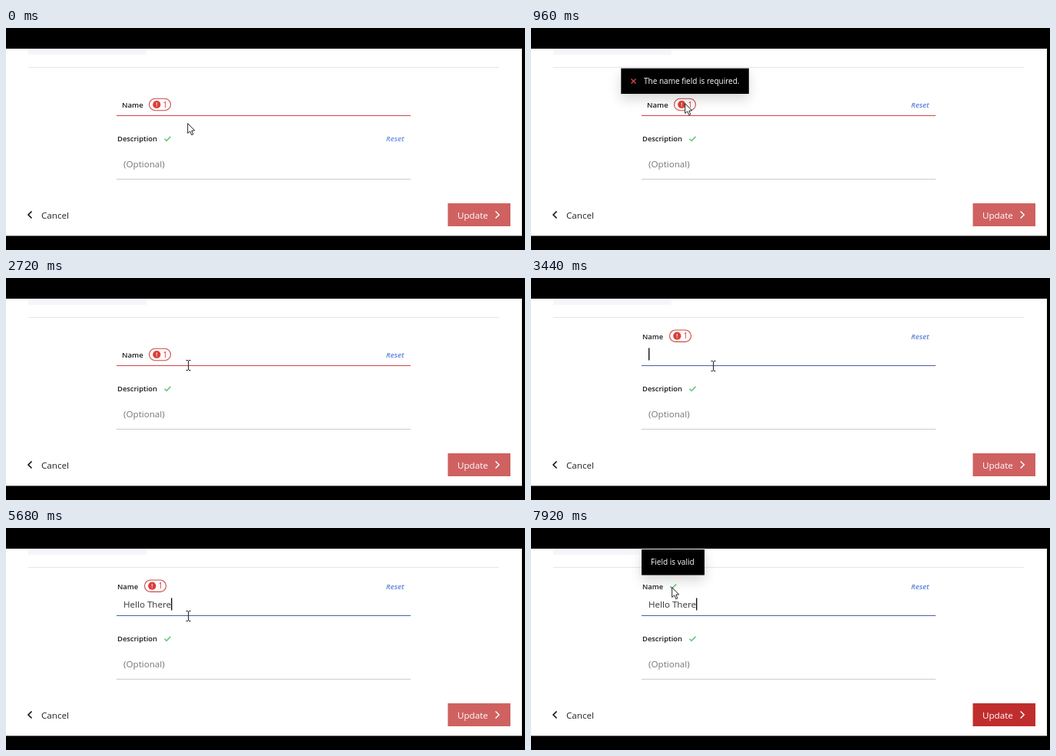
These frames come from a looping animation (676 by 290 pixels, 8000 ms). An HTML page with a canvas:

```html
<!DOCTYPE html>
<html lang="en">
<head>
<meta charset="utf-8">
<title>Form validation</title>
<style>
  html, body { margin: 0; width: 100%; height: 100%; overflow: hidden; background: #000; }
  canvas { display: block; }
</style>
</head>
<body>
<canvas id="stage" width="676" height="290"></canvas>
<script>
const ctx = document.getElementById('stage').getContext('2d');
const LOOP = 8000, STEP = 80;
const SANS = '"Open Sans", "Noto Sans", sans-serif';
const RED = [203, 72, 72], BLUE = [74, 93, 166];
const FADED = [207, 97, 97], VIVID = [192, 45, 45];

// time, x, y of the pointer
const POINTER = [
  [0, 236, 124], [40, 236, 124], [320, 213, 103], [520, 213, 103], [720, 208, 99],
  [920, 200, 98], [2360, 200, 98], [2640, 237, 114], [3400, 237, 114], [3440, 237, 115],
  [6220, 237, 115], [6480, 240, 118], [7280, 240, 118], [7580, 183, 77], [LOOP, 183, 77]
];
const WORDS = 'Hello There';
const KEY_TIMES = [4320, 4480, 4560, 4720, 4960, 5200, 5280, 5360, 5440, 5520, 5680];
const CARET_TOGGLES = [3120, 3600, 4160, 6240, 6720, 7280, 7840];

const ramp = (t, from, to) => Math.min(1, Math.max(0, (t - from) / (to - from)));
const ease = p => p * p * (3 - 2 * p);
const mix = (a, b, p) => a + (b - a) * p;
const blend = (a, b, p) => `rgb(${a.map((v, i) => Math.round(mix(v, b[i], p)))})`;

function withAlpha(alpha, draw) {
  if (alpha <= 0) return;
  ctx.save();
  ctx.globalAlpha *= alpha;
  draw();
  ctx.restore();
}

function rect(x, y, w, h, color) {
  ctx.fillStyle = color;
  ctx.fillRect(x, y, w, h);
}

function text(str, x, y, size, color, style = '') {
  ctx.font = `${style} ${size}px ${SANS}`;
  ctx.fillStyle = color;
  ctx.fillText(str, x, y);
}

function trace(points, x, y) {
  ctx.beginPath();
  points.forEach(([px, py]) => ctx.lineTo(x + px, y + py));
}

function line(points, x, y, color, width) {
  trace(points, x, y);
  ctx.strokeStyle = color;
  ctx.lineWidth = width;
  ctx.stroke();
}

function check(x, y) {
  line([[-4, 0.3], [-1.4, 2.8], [4, -2.6]], x, y, '#6acb85', 1.7);
}

function badge(x, y) {
  ctx.beginPath();
  ctx.roundRect(x + 0.5, y - 7.7, 28, 15.4, 7.7);
  ctx.fillStyle = '#fffafa';
  ctx.fill();
  ctx.strokeStyle = '#cc4a4a';
  ctx.lineWidth = 1.1;
  ctx.stroke();
  ctx.beginPath();
  ctx.arc(x + 10.3, y, 5.1, 0, Math.PI * 2);
  ctx.fillStyle = '#d93e38';
  ctx.fill();
  rect(x + 9.7, y - 2.8, 1.2, 3.4, '#fbd5d2');
  rect(x + 9.7, y + 1.5, 1.2, 1.2, '#fbd5d2');
  text('1', x + 18.4, y + 3.6, 10, '#c93c3c');
}

function reset(y, alpha) {
  withAlpha(alpha, () => text('Reset', 495, y, 9.6, '#5b80d8', 'italic 600'));
}

function tooltip(x, y, w, h, alpha, content) {
  withAlpha(alpha, () => {
    ctx.save();
    ctx.shadowColor = 'rgba(0,0,0,.16)';
    ctx.shadowBlur = 16;
    ctx.shadowOffsetY = 7;
    rect(x, y, w, h, '#000');
    ctx.restore();
    content();
  });
}

function arrow(x, y) {
  trace([[0, 0], [0, 12.8], [3, 10.2], [5.1, 15], [7.2, 14.1], [5.1, 9.5], [9, 9.2]], x + 0.7, y + 0.7);
  ctx.closePath();
  ctx.fillStyle = '#fff';
  ctx.fill();
  ctx.strokeStyle = '#222';
  ctx.lineWidth = 1;
  ctx.stroke();
}

function iBeam(x, y) {
  rect(x, y - 6, 1, 12, '#222');
  for (const dy of [-7, 6]) {
    rect(x - 2.5, y + dy, 2.5, 1, '#222');
    rect(x + 1, y + dy, 2.5, 1, '#222');
  }
}

function pointer(t) {
  const i = Math.max(1, POINTER.findIndex(k => k[0] > t));
  const [a, b] = [POINTER[i - 1], POINTER[i]];
  const p = ease(ramp(t, a[0], b[0]));
  const x = mix(a[1], b[1], p), y = mix(a[2], b[2], p);
  const overInput = t > 2500 && t < 7480;
  (overInput ? iBeam : arrow)(x, y);
}

function page() {
  rect(0, 0, 676, 290, '#000');
  rect(0, 27, 672, 244.5, '#fff');
  rect(29, 27, 154, 8, '#f6f6fa');
  rect(29, 51, 613, 1, '#e6e6ea');
  text('Description', 145, 148, 9.4, '#1c1c1c', '600');
  check(210.5, 144.5);
  text('(Optional)', 153, 182.4, 11.65, '#757575');
  rect(144, 197, 383, 1, '#cbcbcb');
  line([[4.5, -4.5], [0, 0], [4.5, 4.5]], 29, 244, '#111', 1.6);
  text('Cancel', 46, 248.5, 11.65, '#222');
}

function nameField(t) {
  const lift = ease(ramp(t, 3060, 3280));
  const valid = ramp(t, 6180, 6500);
  const labelY = mix(100.3, 76, lift);
  rect(144, 114, 383, 1, blend(RED, BLUE, lift));
  text('Name', mix(151, 145, lift), labelY + 3.6, mix(9.6, 9.4, lift), '#1c1c1c', '600');
  withAlpha(1 - valid, () => badge(mix(186, 180, lift), labelY - 0.3));
  withAlpha(valid, () => check(185.2, 76));

  const typed = WORDS.slice(0, KEY_TIMES.filter(k => k <= t).length);
  text(typed, 153, 104, 11.6, '#333');
  if (CARET_TOGGLES.filter(k => k <= t).length % 2) {
    rect(153 + ctx.measureText(typed).width, 91.5, 1.4, 16, '#111');
  }
  const hover = ramp(t, 40, 280);
  reset(148, 0.9 * (1 - hover));
  reset(mix(104, 79.6, lift), hover);
}

function updateButton(t) {
  rect(575.5, 229, 81.5, 30, blend(FADED, VIVID, ramp(t, 6180, 6500)));
  text('Update', 588, 248.5, 11.65, '#fff');
  line([[0, -4.6], [4.6, 0], [0, 4.6]], 637.6, 244, '#fff', 1.4);
}

function tooltips(t) {
  const errorAlpha = Math.min(ramp(t, 520, 860), 1 - ramp(t, 2350, 2670));
  tooltip(117.3, 52.7, 166.5, 33.3, errorAlpha, () => {
    line([[-3, -3], [3, 3]], 133.5, 69.5, '#e5484d', 1.2);
    line([[-3, 3], [3, -3]], 133.5, 69.5, '#e5484d', 1.2);
    text('The name field is required.', 147, 73, 10.03, '#fff');
  });
  tooltip(144, 28, 82, 33.5, ramp(t, 7540, 7880), () => {
    text('Field is valid', 156, 48.4, 10.1, '#fff');
  });
}

const start = performance.now();
function frame(now) {
  const elapsed = Math.max(0, now - start) % LOOP;
  const t = Math.floor(elapsed / STEP) * STEP;
  page();
  nameField(t);
  updateButton(t);
  tooltips(t);
  pointer(t);
  requestAnimationFrame(frame);
}
requestAnimationFrame(frame);
</script>
</body>
</html>
```
